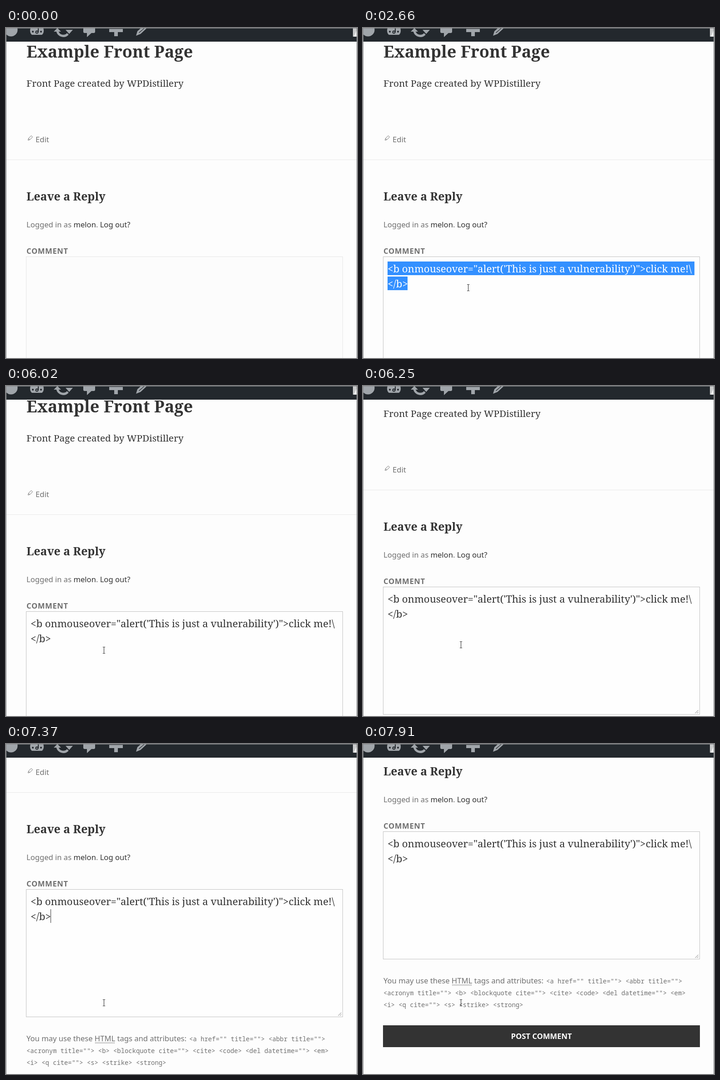
Recreate the animation shown at these times as an HTML page. Size 772 by 725 pixels, loop 8000 ms.

```html
<!DOCTYPE html>
<html lang="en">
<head>
<meta charset="utf-8">
<title>Comment form</title>
<style>
html, body { margin: 0; width: 100%; height: 100%; overflow: hidden; background: #fdfdfd; }
.stage { position: relative; width: 100%; height: 100%; overflow: clip; contain: paint; }
svg { position: absolute; left: 0; top: 0; display: block; }
.serif { font-family: "Noto Serif", serif; fill: #333; }
.small { font: 16.6px "Noto Sans", sans-serif; fill: #707070; }
.code { font: 13.85px "Noto Sans Mono", monospace; fill: #707070; white-space: pre; }
.bold { font-weight: 700; }
.dark { fill: #333; }

/* Percentages are milliseconds / 80 */
.page, .field, .typed, .marked, .caret, .mouse, .arrow, .beam {
  animation: 8s step-end infinite;
}
.page { animation-name: scroll; animation-timing-function: cubic-bezier(.6, 0, .4, 1); }
.field { animation-name: focus; }
.typed { animation-name: type; font-size: 22.2px; }
.marked { animation-name: mark; }
.caret { animation-name: blink; }
.mouse { animation-name: move; }
.arrow { animation-name: arrow; }
.beam { animation-name: beam; }

@keyframes scroll {
  0%, 73.875% { top: 0; }
  78.75%, 85% { top: -62px; }
  89.625% { top: -124px; }
  92.75% { top: -186px; }
  94.875%, 95.5% { top: -248px; }
  98.875%, 100% { top: -310px; }
}
@keyframes focus {
  0% { fill: #fcfcfc; stroke: #e6e6e6; }
  15.5%, 100% { fill: #fefefe; stroke: #c1c1c1; }
}
@keyframes type {
  0% { opacity: 0; fill: #fff; }
  16.125% { opacity: 1; fill: #fff; }
  39.875%, 100% { opacity: 1; fill: #333; }
}
@keyframes mark {
  0%, 39.875%, 100% { opacity: 0; }
  16.125% { opacity: 1; }
}
@keyframes blink {
  0%, 46.5%, 59.25%, 72%, 85%, 97.875%, 100% { opacity: 0; }
  39.875%, 52.375%, 65.5%, 78.375%, 91.25% { opacity: 1; }
}
@keyframes move {
  0% { transform: translate(35px, 574px); }
  9.375% { transform: translate(38px, 576px); }
  10.125% { transform: translate(84px, 575px); }
  10.75% { transform: translate(160px, 558px); }
  11.5% { transform: translate(226px, 534px); }
  12.125% { transform: translate(255px, 521px); }
  12.875% { transform: translate(242px, 547px); }
  23.625% { transform: translate(242px, 547px); animation-timing-function: linear; }
  29.375% { transform: translate(236px, 565px); }
  30.5% { transform: translate(236px, 565px); animation-timing-function: linear; }
  33.25% { transform: translate(232px, 570px); }
  65.5% { transform: translate(232px, 570px); animation-timing-function: linear; }
  69.25% { transform: translate(216px, 580px); }
  77.5%, 100% { transform: translate(216px, 568px); }
}
@keyframes arrow {
  0%, 10.125%, 100% { opacity: 0; }
  6.25% { opacity: 1; }
}
@keyframes beam {
  0% { opacity: 0; }
  10.125%, 100% { opacity: 1; }
}
</style>
</head>
<body>
<div class="stage">
<svg class="page" width="772" height="1040">
  <text class="serif bold" x="45" y="65" font-size="36">Example Front Page</text>
  <text class="serif" x="45" y="129" font-size="20.75">Front Page created by WPDistillery</text>

  <path d="M48.5 246.5l1-4 6-6 3 3-6 6zM49.5 242.5l3 3" fill="none" stroke="#707070" stroke-linejoin="round"/>
  <text class="small" x="65" y="251">Edit</text>
  <path d="M1 289.5H771" stroke="#e8e8e8"/>

  <text class="serif bold" x="45" y="379" font-size="24.9">Leave a Reply</text>
  <text class="small" x="45" y="438">Logged in as <tspan class="dark">melon</tspan>. <tspan class="dark">Log out?</tspan></text>
  <text class="small bold" x="45" y="496" letter-spacing=".04em">COMMENT</text>

  <rect class="field" x="44.5" y="502.5" width="696" height="280"/>
  <path d="M730.5 780l7-7M734.5 780l3-3" stroke="#777"/>
  <path class="marked" d="M54 513h675v30H54zM54 546h44v30H54z" fill="#3390ff"/>
  <g class="serif typed">
    <text x="54" y="537">&lt;b onmouseover="alert('This is just a vulnerability')"&gt;click me!\</text>
    <text x="54" y="570">&lt;/b&gt;</text>
  </g>
  <rect class="caret" x="98" y="546" width="1" height="30" fill="#333"/>

  <text class="small" x="45" y="836">You may use these HTML tags and attributes:</text>
  <path d="M196 838.5h44M196 840.5h44" stroke="#707070" stroke-dasharray="1 1"/>
  <g class="code">
    <text x="403" y="836">&lt;a href="" title=""&gt; &lt;abbr title=""&gt;</text>
    <text x="45" y="862">&lt;acronym title=""&gt; &lt;b&gt; &lt;blockquote cite=""&gt; &lt;cite&gt; &lt;code&gt; &lt;del datetime=""&gt; &lt;em&gt;</text>
    <text x="45" y="888">&lt;i&gt; &lt;q cite=""&gt; &lt;s&gt; &lt;strike&gt; &lt;strong&gt;</text>
  </g>

  <rect x="44" y="928" width="697" height="48" fill="#333"/>
  <text class="small bold" x="392.5" y="958" text-anchor="middle" style="fill:#fff">POST COMMENT</text>
</svg>

<svg width="772" height="725">
  <!-- Toolbar -->
  <rect width="772" height="30" fill="#23282d"/>
  <g fill="#a0a5aa">
    <circle cx="11" cy="4" r="14.5"/>
    <path d="M54 0C52 6 53 12 57 15H79C83 12 84 6 82 0Z"/>
    <path d="M105 8L113 0L121 8ZM131 4H147L139 13Z"/>
    <path d="M113 7A13.5 13.5 0 0 0 136 13" fill="none" stroke="#a0a5aa" stroke-width="5"/>
    <path d="M170 0H196V8Q196 11 193 11H188L178 20V11H173Q170 11 170 8Z"/>
    <path d="M227 2H257V9H246V18H238V9H227Z"/>
    <path d="M286 17L289 7L297 0H310L296 13Z"/>
  </g>
  <g fill="#23282d">
    <circle cx="59" cy="8" r="2"/>
    <circle cx="77" cy="8" r="2"/>
    <circle cx="68" cy="9" r="3.5"/>
    <path d="M70 0h2v9h-2z"/>
    <path d="M292 10L304 0h1.5L293 11z"/>
  </g>
  <circle cx="68" cy="9" r="1.5" fill="#a0a5aa"/>
  <rect x="763" width="8" height="19" fill="#c9cacb"/>
  <path d="M771 6V19H765Z" fill="#f4f4f4"/>

  <!-- Window edge -->
  <path d="M.5 725V.5H771.5V725" fill="none" stroke="#8c8e90"/>

  <g class="mouse">
    <path class="arrow" d="M-5.5-7.5v13l3-2.7 2 4.5 2-.9-2-4.4h4z" fill="#fff" stroke="#222"/>
    <path class="beam" d="M-3-6.5h2l.5.5.5-.5h2M-3 7.5h2l.5-.5.5.5h2M-.5-6V7" fill="none" stroke="#222"/>
  </g>
</svg>
</div>
</body>
</html>
```
